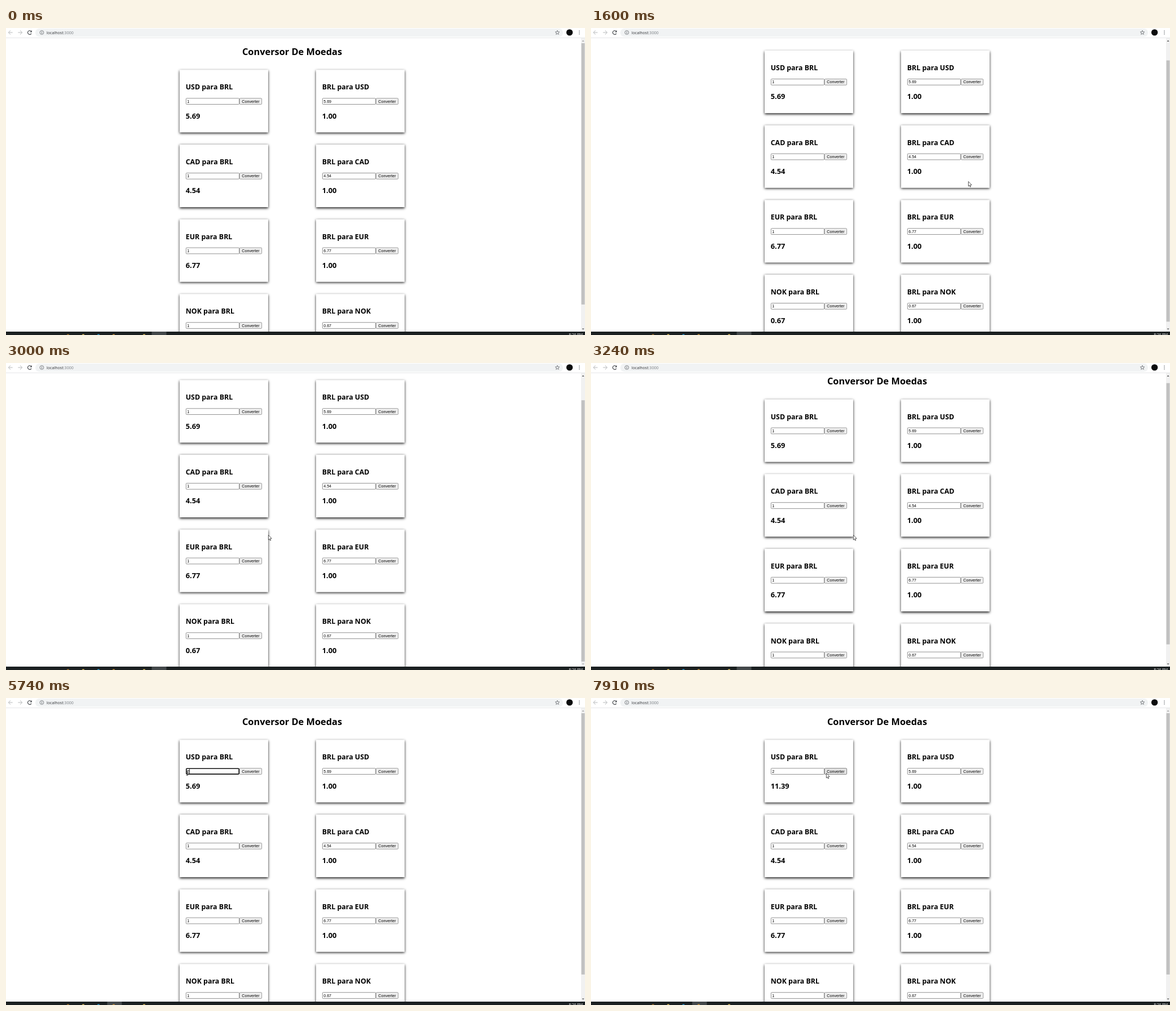
These frames come from a looping animation (1027 px wide and 545 px high, 7.99 s). An HTML page with a canvas:

```html
<!DOCTYPE html>
<html lang="pt-BR">
<head>
<meta charset="utf-8">
<title>Conversor De Moedas</title>
<style>
html, body { margin: 0; width: 100%; height: 100%; overflow: hidden; background: #fff; }
canvas { display: block; width: 1027px; height: 545px; }
</style>
</head>
<body>
<canvas id="stage"></canvas>
<script>
const W = 1027, H = 545, LOOP = 7990, TICK = 76;
const TOP = 18, BOTTOM = 539, MAX_SCROLL = 44;
const HEAD = '"Open Sans", "Noto Sans", sans-serif';
const FORM = '"Liberation Sans", Arial, sans-serif';
const RATES = { USD: '5.69', CAD: '4.54', EUR: '6.77', NOK: '0.67' };
const FIELD = { x: 319, y: 124.4, w: 95, h: 11.5 };
const BUTTON = { x: 414, y: 124.4, w: 40, h: 11.5 };

// Pointer glides: start time, end time, end point, downward sag of the path
const ENTRY = { x: 993, y: 535 };
const GLIDES = [
  { from: 370, to: 900, x: 596, y: 212, sag: 0 },
  { from: 1060, to: 1440, x: 669, y: 272, sag: 0 },
  { from: 2290, to: 3000, x: 465, y: 305, sag: 53 },
  { from: 3540, to: 3700, x: 337, y: 123, sag: 0 },
  { from: 3930, to: 4330, x: 321.5, y: 133.5, sag: 0 },
  { from: 5740, to: 6500, x: 417, y: 133, sag: 7 }
];

const canvas = document.getElementById('stage');
const ctx = canvas.getContext('2d');
const dpr = window.devicePixelRatio || 1;
canvas.width = Math.round(W * dpr);
canvas.height = Math.round(H * dpr);

const clamp = v => Math.max(0, Math.min(1, v));
const smooth = v => v * v * (3 - 2 * v);
const inside = (p, r) => p && p.x >= r.x && p.x < r.x + r.w && p.y >= r.y && p.y < r.y + r.h;

// Progress from 0 to 1 in even jumps, as a screen recorder catches it
function stepped(t, from, to) {
  const n = Math.round((to - from) / TICK);
  return Math.floor(clamp((t - from) / (to - from)) * n + 1e-6) / n;
}

function pointerAt(t) {
  const typing = t >= 4560 && t < 5740;
  if (t < GLIDES[0].from || typing) return null;
  let p = ENTRY;
  for (const g of GLIDES) {
    if (t < g.from) break;
    const u = stepped(t, g.from, g.to);
    p = {
      x: p.x + (g.x - p.x) * u,
      y: p.y + (g.y - p.y) * u + 4 * g.sag * u * (1 - u)
    };
  }
  return p;
}

// One turn of the wheel, shown every 80 ms
const wheel = (t, from) => smooth(clamp(Math.floor((t - from) / 80) * 80 / 230));
const scrollAt = t => MAX_SCROLL * (wheel(t, 1440) - wheel(t, 3070));

function formAt(t, pointer) {
  const focus = t >= 4160 && t < 6424;
  return {
    focus,
    value: t < 4950 ? '1' : t < 5270 ? '' : '2',
    result: t < 7460 ? RATES.USD : '11.39',
    caret: focus && t >= 4310 && t < 5816 && (t - 4310) % 960 < 480,
    hoverField: t > 3900 && inside(pointer, FIELD),
    hoverButton: t > 3900 && inside(pointer, BUTTON)
  };
}

function text(str, x, y, font, color = '#000', align = 'left') {
  ctx.font = font;
  ctx.fillStyle = color;
  ctx.textAlign = align;
  ctx.fillText(str, x, y);
}

function rect(x, y, w, h, color) {
  ctx.fillStyle = color;
  ctx.fillRect(x, y, w, h);
}

function disc(x, y, r, color) {
  ctx.fillStyle = color;
  ctx.beginPath();
  ctx.arc(x, y, r, 0, 7);
  ctx.fill();
}

function arc(x, y, r, a, b, color, width) {
  ctx.strokeStyle = color;
  ctx.lineWidth = width;
  ctx.beginPath();
  ctx.arc(x, y, r, a, b);
  ctx.stroke();
}

function poly(points, fill, stroke, width = 1, close = true) {
  ctx.beginPath();
  points.forEach(([x, y]) => ctx.lineTo(x, y));
  if (close) ctx.closePath();
  if (fill) { ctx.fillStyle = fill; ctx.fill(); }
  if (stroke) { ctx.strokeStyle = stroke; ctx.lineWidth = width; ctx.stroke(); }
}

// Rounded box with its border drawn inside the edge
function box(x, y, w, h, r, fill, border, width = 0) {
  ctx.beginPath();
  ctx.roundRect(x + width / 2, y + width / 2, w - width, h - width, r);
  ctx.fillStyle = fill;
  ctx.fill();
  if (!border) return;
  ctx.strokeStyle = border;
  ctx.lineWidth = width;
  ctx.stroke();
}

function card(x, y, title, form) {
  ctx.save();
  ctx.shadowColor = 'rgba(0,0,0,.9)';
  ctx.shadowBlur = 4.4 * dpr;
  ctx.shadowOffsetY = 1.6 * dpr;
  rect(x, y, 157, 111.2, '#fff');
  ctx.restore();

  const left = x + 11, top = y + 50.2, base = y + 58.5;
  text(title, left - .3, y + 35.2, 'bold 12.4px ' + HEAD);
  text(form.result, left - .3, y + 86.4, 'bold 12.8px ' + HEAD);

  const border = form.focus ? '#101010' : form.hoverField ? '#333' : '#767676';
  box(left, top, FIELD.w, FIELD.h, 1, '#fff', border, form.focus ? 1.6 : .8);
  text(form.value, left + 2.2, base, '7.13px ' + FORM);
  if (form.caret) rect(left + 6.1, top + 1.6, .8, 8.4, '#000');

  const hot = form.hoverButton;
  box(left + FIELD.w, top, BUTTON.w, BUTTON.h, 1.4, hot ? '#e3e3e3' : '#efefef', hot ? '#555' : '#767676', .7);
  text('Converter', left + FIELD.w + BUTTON.w / 2, base, '7.13px ' + FORM, '#000', 'center');
}

function page(form, scroll) {
  ctx.save();
  ctx.beginPath();
  ctx.rect(0, TOP, W, BOTTOM - TOP);
  ctx.clip();
  text('Conversor De Moedas', 507.5, 48 - scroll, 'bold 16.35px ' + HEAD, '#000', 'center');
  Object.entries(RATES).forEach(([code, rate], i) => {
    const y = 74.2 + 132.65 * i - scroll;
    card(308, y, code + ' para BRL', i ? { value: '1', result: rate } : form);
    card(550, y, 'BRL para ' + code, { value: rate, result: '1.00' });
  });
  ctx.restore();
}

function scrollbar(scroll) {
  const view = BOTTOM - TOP, track = view - 18;
  const scale = track / (view + MAX_SCROLL);
  rect(1020, TOP, 7, view, '#f1f1f1');
  rect(1020.6, TOP + 9 + scroll * scale, 5.9, view * scale, '#c1c1c1');
  const arrow = (y, dir, live) =>
    poly([[1021.6, y], [1023.6, y - 2.2 * dir], [1025.6, y]], live ? '#505050' : '#a3a3a3');
  arrow(24, 1, scroll > 0);
  arrow(533.4, -1, scroll < MAX_SCROLL);
}

function navArrow(x, dir) {
  const tip = x - 3.7 * dir;
  poly([[tip, 8], [x + 3.7 * dir, 8]], null, '#b5b7b9', 1, false);
  poly([[x, 4.4], [tip, 8], [x, 11.6]], null, '#b5b7b9', 1, false);
}

function toolbar() {
  rect(0, 0, W, TOP, '#fff');
  rect(0, 17, W, 1, '#e6e7e8');
  box(52, 1, 936, 14.5, 7.2, '#f1f3f4');
  navArrow(8, 1);
  navArrow(25, -1);

  arc(42, 8, 3.4, .5, 5.5, '#4b4e52', 1.1);
  poly([[45.9, 4], [45.9, 7.5], [42.4, 7.5]], '#4b4e52');

  arc(63.5, 8, 3.4, 0, 7, '#5f6368', .8);
  rect(63.1, 7.4, .9, 2.6, '#5f6368');
  rect(63.1, 5.8, .9, .9, '#5f6368');

  const font = '7.1px ' + HEAD;
  text('localhost', 72, 10.6, font, '#303236');
  text(':3000', 72 + ctx.measureText('localhost').width, 10.6, font, '#777b80');

  const star = Array.from({ length: 10 }, (_, i) => {
    const a = (i / 5 - .5) * Math.PI, r = i % 2 ? 1.7 : 3.9;
    return [978 + r * Math.cos(a), 8.2 + r * Math.sin(a)];
  });
  poly(star, null, '#5f6368', .8);

  disc(999.6, 7.9, 5.7, '#0b0c0d');
  for (let i = -1; i <= 1; i++) disc(1017, 8 + 2.8 * i, .8, '#5f6368');
}

function taskbar(t) {
  rect(0, BOTTOM, W, H - BOTTOM, '#1b2021');
  rect(t < 4160 ? 258.5 : 179.5, BOTTOM, 26, 6, '#43484a');
  ['#a8742c', '#e2c25c', '#2c9bd0', '#c9913a', '#1b2021', '#e2c25c']
    .forEach((color, i) => disc(110 + 27 * i, 546, 2.4, color));
  text('8:26 PM', 1023, 547, '6.6px ' + HEAD, '#f4f4f4', 'right');
}

function drawPointer(p) {
  if (!p) return;
  ctx.save();
  ctx.translate(p.x, p.y);
  if (inside(p, FIELD)) {
    rect(-.4, -4, .8, 8, '#333');
    rect(-2, -4.5, 4, .7, '#333');
    rect(-2, 3.8, 4, .7, '#333');
  } else {
    poly([[.4, .5], [.4, 9], [2.3, 7.3], [3.5, 10.2], [4.8, 9.6], [3.6, 6.8], [6.2, 6.5]], '#fff', '#222', .75);
  }
  ctx.restore();
}

function draw(t) {
  const scroll = scrollAt(t), pointer = pointerAt(t);
  ctx.setTransform(dpr, 0, 0, dpr, 0, 0);
  rect(0, 0, W, H, '#fff');
  page(formAt(t, pointer), scroll);
  scrollbar(scroll);
  toolbar();
  taskbar(t);
  drawPointer(pointer);
}

const start = performance.now();
function frame() {
  draw((performance.now() - start) % LOOP);
  requestAnimationFrame(frame);
}
frame();
</script>
</body>
</html>
```
